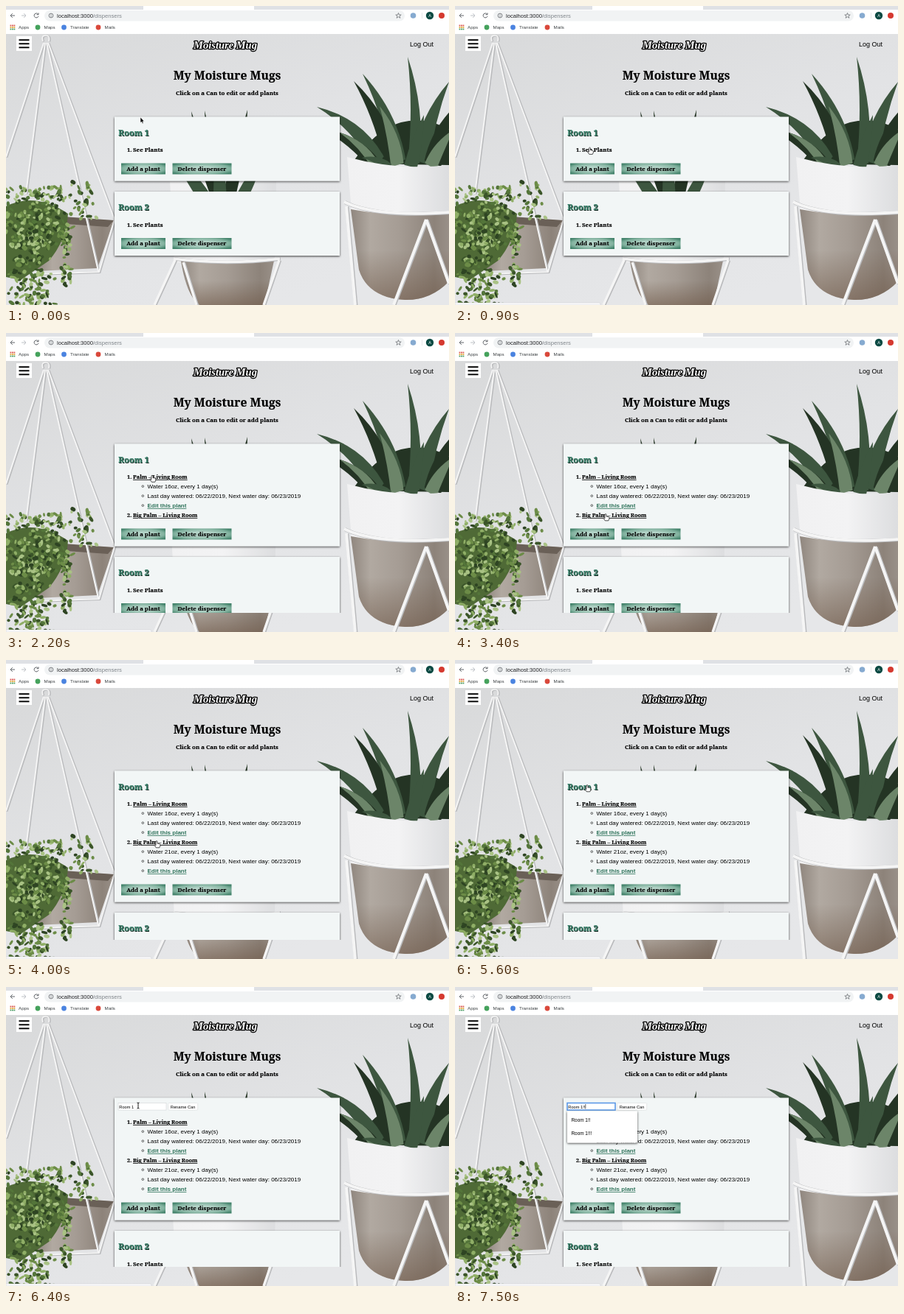
An HTML page for the animation above (8 s loop, 600 by 406 pixels).

```html
<!DOCTYPE html>
<html lang="en">
<head>
<meta charset="utf-8">
<title>Dispensers</title>
<style>
  html, body { margin: 0; width: 100%; height: 100%; overflow: hidden; background: #dcdddf; }
  svg { display: block; width: 100vw; height: 100vh; }
  text { white-space: pre; }
  .sans { font-family: "Liberation Sans", Arial, sans-serif; }
  .serif { font-family: "Noto Serif", "Liberation Serif", serif; font-weight: 700; stroke: currentColor; stroke-width: .15px; }
  .link { text-decoration: underline; }
  .logo { font: italic 700 14.5px "Liberation Serif", serif; fill: #fff; stroke: #000; stroke-width: 2.6px;
          paint-order: stroke; stroke-linejoin: round; }
</style>
</head>
<body>
<svg viewBox="0 0 600 406" preserveAspectRatio="none">
  <defs>
    <linearGradient id="wall" x2=".6" y2="1">
      <stop offset="0" stop-color="#d8d9da"/><stop offset=".55" stop-color="#e2e3e5"/><stop offset="1" stop-color="#e6e7e9"/>
    </linearGradient>
    <linearGradient id="clay">
      <stop offset="0" stop-color="#8f867e"/><stop offset=".2" stop-color="#b1a9a1"/><stop offset=".5" stop-color="#a59c94"/>
      <stop offset=".85" stop-color="#8d837a"/><stop offset="1" stop-color="#999088"/>
    </linearGradient>
    <linearGradient id="base" x2="0" y2="1">
      <stop offset=".45" stop-color="#6b5443" stop-opacity="0"/><stop offset="1" stop-color="#6b5443" stop-opacity=".55"/>
    </linearGradient>
    <linearGradient id="glaze">
      <stop offset="0" stop-color="#f1f1f2"/><stop offset=".5" stop-color="#f3f3f4"/><stop offset="1" stop-color="#dcdddf"/>
    </linearGradient>
    <radialGradient id="btn" r=".62">
      <stop offset=".3" stop-color="#b3d3c7"/><stop offset=".75" stop-color="#82b29f"/><stop offset="1" stop-color="#43836b"/>
    </radialGradient>
    <filter id="shade" x="-10%" y="-10%" width="120%" height="125%">
      <feDropShadow dx="0" dy="1" stdDeviation="1.8" flood-opacity=".75"/>
    </filter>
    <clipPath id="page"><path d="M0 38H600V380H0Z"/></clipPath>
  </defs>
  <g id="photo"></g>
  <g id="header"></g>
  <g id="cards" clip-path="url(#page)"></g>
  <path id="status" d="M0 403H195Q197 403 197 405V406H0Z" fill="#f8f9fa" stroke="#c4c6c9" stroke-width=".4"/>
  <g id="pointer"></g>
  <g id="chrome"></g>
</svg>
<script>
const LOOP = 8000;
const $ = id => document.getElementById(id);

const rect = (x, y, w, h, fill, more = '') =>
  `<rect x="${x}" y="${y}" width="${w}" height="${h}" fill="${fill}" ${more}/>`;
const circle = (x, y, r, fill, more = '') => `<circle cx="${x}" cy="${y}" r="${r}" fill="${fill}" ${more}/>`;
const shape = (d, fill) => `<path d="${d}" fill="${fill}"/>`;
const line = (d, color, w, more = '') =>
  `<path d="${d}" fill="none" stroke="${color}" stroke-width="${w}" ${more}/>`;
const text = (cls, x, y, size, s, color = '#000', more = '') =>
  `<text class="${cls}" x="${x}" y="${y}" font-size="${size}" fill="${color}" color="${color}" ${more}>${s}</text>`;
const sans = (...a) => text('sans', ...a);
const serif = (...a) => text('serif', ...a);
const CENTER = 'text-anchor="middle"';

let seed = 7;
const rand = () => (seed = (seed * 16807) % 2147483647) / 2147483647;

// Tapered leaf from base to tip, bowed sideways by bend.
function leaf(bx, by, tx, ty, w, fill, bend = 0) {
  const len = Math.hypot(tx - bx, ty - by), nx = (by - ty) / len, ny = (tx - bx) / len;
  const mx = (bx + tx) / 2, my = (by + ty) / 2;
  const at = (x, y, k) => `${(x + nx * k).toFixed(1)} ${(y + ny * k).toFixed(1)}`;
  return shape(`M${at(bx, by, w)}Q${at(mx, my, bend + w)} ${tx} ${ty}Q${at(mx, my, bend - w)} ${at(bx, by, -w)}Z`, fill);
}

// Loose strand of small leaves.
function vine(x, top, bottom, spread, count) {
  const greens = ['#3b5529', '#6c8c47', '#8fae66', '#a9c284', '#54753a', '#2e4423'];
  let s = '';
  for (let i = 0; i < count; i++) {
    const lx = x + (rand() + rand() - 1) * spread, ly = top + rand() * (bottom - top);
    s += `<ellipse rx="${(2 + rand() * 2.4).toFixed(1)}" ry="${(1.3 + rand() * 1.5).toFixed(1)}" fill="${greens[i % 6]}"
      transform="translate(${lx.toFixed(1)} ${ly.toFixed(1)}) rotate(${(rand() * 180).toFixed()})"/>`;
  }
  return s;
}

function photo() {
  const white = '#f5f5f5', grey = '#b9babc';
  const rods = (d, w) => line(d, grey, w + 1, 'transform="translate(1 .5)"') + line(d, white, w);
  const dark = '#243424', mid = '#3d563f', pale = '#6c8569';
  const bowl = 'M467 276Q530 288 600 280V374Q575 400 540 399Q490 396 478 358Z';
  const middle = 'M237 346H363L350 406H262Q244 392 237 346Z';
  return rect(0, 38, 600, 368, 'url(#wall)')
    // hanging planter
    + shape('M44 288L146 291 124 356 42 360Z', 'url(#clay)') + shape('M78 286L146 291 138 300 82 296Z', '#6a6057')
    + rods('M51 50L0 205M53 50L27 255M55 50L125 360M57 50L147 290L126 361L40 364', 2)
    + rods('M50 48Q47 40 54 40Q60 40 58 48', 1.6)
    + shape('M0 272Q40 252 84 282Q82 318 58 346L20 372 0 368Z', '#4f6a36')
    + vine(42, 246, 330, 52, 210) + vine(24, 290, 406, 24, 130) + vine(104, 238, 290, 26, 34)
    + vine(82, 300, 380, 10, 40) + vine(50, 340, 406, 18, 40)
    // middle pot
    + shape('M222 238H366L364 348H228Z', 'url(#glaze)')
    + leaf(288, 264, 251, 143, 8, dark, -6) + leaf(292, 264, 269, 142, 7, dark, -4) + leaf(300, 264, 327, 141, 9, dark, 4)
    + leaf(270, 262, 222, 200, 9, mid, 4) + leaf(318, 262, 350, 200, 8, mid)
    + leaf(290, 266, 288, 180, 9, mid)
    + shape(middle, 'url(#clay)') + shape(middle, 'url(#base)')
    + rods('M227 343Q298 352 371 343M229 345L201 406M240 348L258 406M370 345L349 406', 3.4)
    // aloe
    + shape('M468 214Q500 168 535 158Q570 150 600 168V216Z', dark)
    + leaf(552, 214, 544, 69, 8, mid, 12) + leaf(532, 212, 483, 92, 10, mid, 14)
    + leaf(522, 212, 471, 102, 10, dark, 14) + leaf(562, 212, 600, 103, 11, mid, -12)
    + leaf(578, 214, 606, 138, 12, dark, -6) + leaf(505, 212, 421, 137, 10, mid, 20)
    + leaf(500, 216, 426, 166, 9, dark, 14) + leaf(530, 216, 506, 136, 9, pale, 8)
    + leaf(500, 216, 452, 172, 6, pale, 10) + leaf(575, 218, 606, 168, 9, pale, -5)
    + leaf(548, 218, 566, 148, 9, mid) + leaf(520, 220, 482, 206, 6, mid, 7)
    + shape('M462 205Q530 224 600 216V284Q530 292 468 280Z', 'url(#glaze)')
    + shape(bowl, 'url(#clay)') + shape(bowl, 'url(#base)')
    + rods('M458 266Q500 287 600 280M461 272L473 406M569 290L525 406M569 290L600 377', 4);
}

function chrome() {
  const ink = '#5f6368', tiles = ['#d9534a', '#e0a83a', '#4a9a5f'];
  const mark = (x, color, label) => circle(x, 29, 3.4, color) + sans(x + 8.5, 31.2, 6.2, label, '#3c4043');
  let apps = '';
  for (let i = 0; i < 9; i++) apps += rect(5.5 + i % 3 * 2.5, 25.6 + (i / 3 | 0) * 2.5, 1.8, 1.8, tiles[i / 3 | 0]);
  return rect(0, 0, 600, 38, '#fff') + rect(0, 0, 186, 5, '#dfe1e5') + rect(336, 0, 264, 5, '#dfe1e5')
    + rect(52, 6, 488, 14.5, '#f1f3f4', 'rx="7.2"')
    + line('M12 13H6M8.8 10.2L6 13 8.8 15.8', ink, 1) + line('M21 13H27M24.2 10.2L27 13 24.2 15.8', '#bdc1c6', 1)
    + line('M43.6 11.2A3 3 0 1 0 44 13.8M44 9.4V11.7H41.6', ink, 1)
    + circle(61, 13, 2.9, 'none', `stroke="${ink}" stroke-width=".8"`) + line('M61 12.6V14.6M61 11V11.8', ink, .8)
    + sans(69, 15.7, 7.6, `localhost:3000<tspan fill="#80868b">/dispensers</tspan>`, '#202124')
    + line('M531.5 9.4L532.5 12H535.2L533 13.6 533.9 16.3 531.5 14.7 529.1 16.3 530 13.6 527.8 12H530.5Z', ink, .7)
    + circle(551.5, 13, 3.8, '#86aad0') + line('M563.5 9V17', '#dadce0', .7)
    + circle(574, 13, 5.2, '#0b4a43') + sans(574, 15, 5.4, 'A', '#fff', CENTER)
    + circle(590, 13, 4, '#d5392f')
    + apps + sans(17, 31.2, 6.2, 'Apps', '#3c4043')
    + mark(43, '#45a25c', 'Maps') + mark(78.5, '#4a83e0', 'Translate') + mark(125, '#d9483b', 'Mails');
}

function header() {
  const bars = [45.2, 50.3, 55.4].map(y => rect(17.5, y, 14, 1.9, '#000')).join('');
  return rect(14, 41, 21, 20, '#fff') + bars
    + `<text class="logo" x="297" y="58" ${CENTER}>Moisture Mug</text>`
    + sans(547, 55.3, 9, 'Log Out')
    + serif(299.5, 99.7, 15.7, 'My Moisture Mugs', '#000', CENTER)
    + serif(299.5, 121, 7.9, 'Click on a Can to edit or add plants', '#000', CENTER);
}

const STEP = 13;
function plant(n, y, name, open, oz) {
  let s = serif(164, y, 7.4, n + '.') + text('serif link', 172, y, 7.4, name);
  if (!open) return s;
  const rows = [`Water ${oz}oz, every 1 day(s)`, 'Last day watered: 06/22/2019, Next water day: 06/23/2019'];
  for (let i = 0; i < 3; i++) s += circle(185.3, y + STEP * (i + 1) - 2.8, 1.3, 'none', 'stroke="#000" stroke-width=".6"');
  rows.forEach((row, i) => s += sans(191.5, y + STEP * (i + 1), 8, row));
  return s + text('sans link', 191.5, y + STEP * 3, 8, 'Edit this plant', '#2f735b', 'font-weight="700"');
}

function button(x, y, w, label) {
  return rect(x, y - 7.5, w, 15, 'url(#btn)') + serif(x + w / 2, y + 2.6, 7.8, label, '#000', CENTER);
}

function form(y, s) {
  const value = 'Room 1' + s.typed;
  const border = s.focus ? 'stroke="#5b98e6" stroke-width="1.6"' : 'stroke="#d2d4d6" stroke-width=".6"';
  return rect(152, y + 7, 65, 9.6, '#fff', border) + sans(153.3, y + 14, 5.7, value)
    + rect(219.7, y + 7, 40, 9.6, '#fff', 'stroke="#d2d4d6" stroke-width=".5" rx="1"')
    + sans(239.6, y + 14, 5.7, 'Rename Can', '#000', CENTER)
    + (s.focus ? line(`M${173.6 + s.typed.length * 1.6} ${y + 8.5}v6.5`, '#000', .6) : '');
}

function suggestions(s) {
  const items = ['Room 1!', 'Room 1!!', 'Room 1!!!'].slice(s.typed.length > 1 ? 1 : 0);
  return rect(152, 168.5, 95, items.length * 18 + 7, '#fff', 'filter="url(#shade)" rx="1"')
    + items.map((item, i) => sans(157.5, 183.2 + i * 18, 6.4, item)).join('');
}

function card(y, title, s) {
  let row = y + (s.form ? 35.5 : 47.5);
  let body = s.form ? form(y, s)
    : serif(152.7, y + 26, 11.2, title, '#13261f') + serif(152, y + 25.3, 11.2, title, '#38806a');
  if (s.list) {
    body += plant(1, row, 'Palm – Living Room', s.palm, 16);
    row += s.palm ? STEP * 4 : STEP;
    body += plant(2, row, 'Big Palm – Living Room', s.big, 21);
    if (s.big) row += STEP * 3;
  } else body += serif(164, row, 7.6, '1.') + serif(172, row, 7.9, 'See Plants');
  const mid = row + 23, bottom = mid + 16.5;
  const svg = rect(147, y, 305, bottom - y, '#f2f6f6', 'filter="url(#shade)"') + body
    + button(156, mid, 60, 'Add a plant') + button(225.5, mid, 80, 'Delete dispenser');
  return { svg, bottom };
}

function cards(s) {
  const first = card(150.5, 'Room 1', s);
  return first.svg + card(first.bottom + 14.5, 'Room 2', {}).svg + (s.focus ? suggestions(s) : '');
}

const cursors = {
  arrow: '<path d="M0 0V8.4L1.9 6.8 3.2 9.6 4.6 9 3.4 6.3H5.8Z" fill="#000" stroke="#fff" stroke-width=".6" transform="scale(.9)"/>',
  hand: '<path d="M-1.2 1Q0 -.8 1.2 1V4.2Q4.6 4 5.5 5.6V8L4.3 10.6H-.8L-3.6 6.6Q-3.4 5.2 -1.2 7Z" fill="#fff" stroke="#000" stroke-width=".8" transform="scale(.88)"/>',
  beam: line('M-1.5 -4Q0 -4 0 -3Q0 -4 1.5 -4M0 -3V3M-1.5 4Q0 4 0 3Q0 4 1.5 4', '#000', .9),
  none: ''
};

// Moves: start, end, target x, y, cursor on the way, cursor on arrival.
const moves = [
  [0, 700, 182.5, 192, 'arrow', 'hand'],
  [1100, 1600, 198, 193, 'hand', 'hand'],
  [2500, 3000, 203, 245, 'arrow', 'hand'],
  [3200, 3400, 204, 245.5, 'hand', 'hand'],
  [4800, 5400, 179, 169.5, 'arrow', 'arrow'],
  [5500, 5600, 179, 169.5, 'arrow', 'hand'],
  [5700, 5800, 179, 169.5, 'hand', 'arrow'],
  [6000, 6400, 179, 161, 'arrow', 'beam'],
  [6900, 7000, 179, 161, 'beam', 'none']
];

function pointer(t) {
  const now = Math.floor(t / 100) * 100;
  let x = 182, y = 151, kind = 'arrow';
  for (const [from, to, tx, ty, going, there] of moves) {
    if (now <= from) break;
    const p = Math.min(1, (now - from) / (to - from)), k = p * p * (3 - 2 * p);
    x += (tx - x) * k;
    y += (ty - y) * k;
    kind = p < 1 ? going : there;
  }
  return { x, y, kind };
}

let shown = '', cursor = '';
function draw(t) {
  const s = {
    list: t >= 1000, palm: t >= 2200, big: t >= 4000, form: t >= 5800, focus: t >= 6600,
    typed: t < 7000 ? '' : t < 7200 ? '!' : '!!'
  };
  const key = JSON.stringify(s);
  if (key !== shown) $('cards').innerHTML = cards(s);
  shown = key;
  $('status').style.display = t >= 900 ? '' : 'none';
  const p = pointer(t);
  if (p.kind !== cursor) $('pointer').innerHTML = cursors[p.kind];
  cursor = p.kind;
  $('pointer').setAttribute('transform', `translate(${p.x} ${p.y})`);
}

$('photo').innerHTML = photo();
$('header').innerHTML = header();
$('chrome').innerHTML = chrome();
const start = performance.now();
function tick() {
  draw((performance.now() - start) % LOOP);
  requestAnimationFrame(tick);
}
tick();
</script>
</body>
</html>
```
